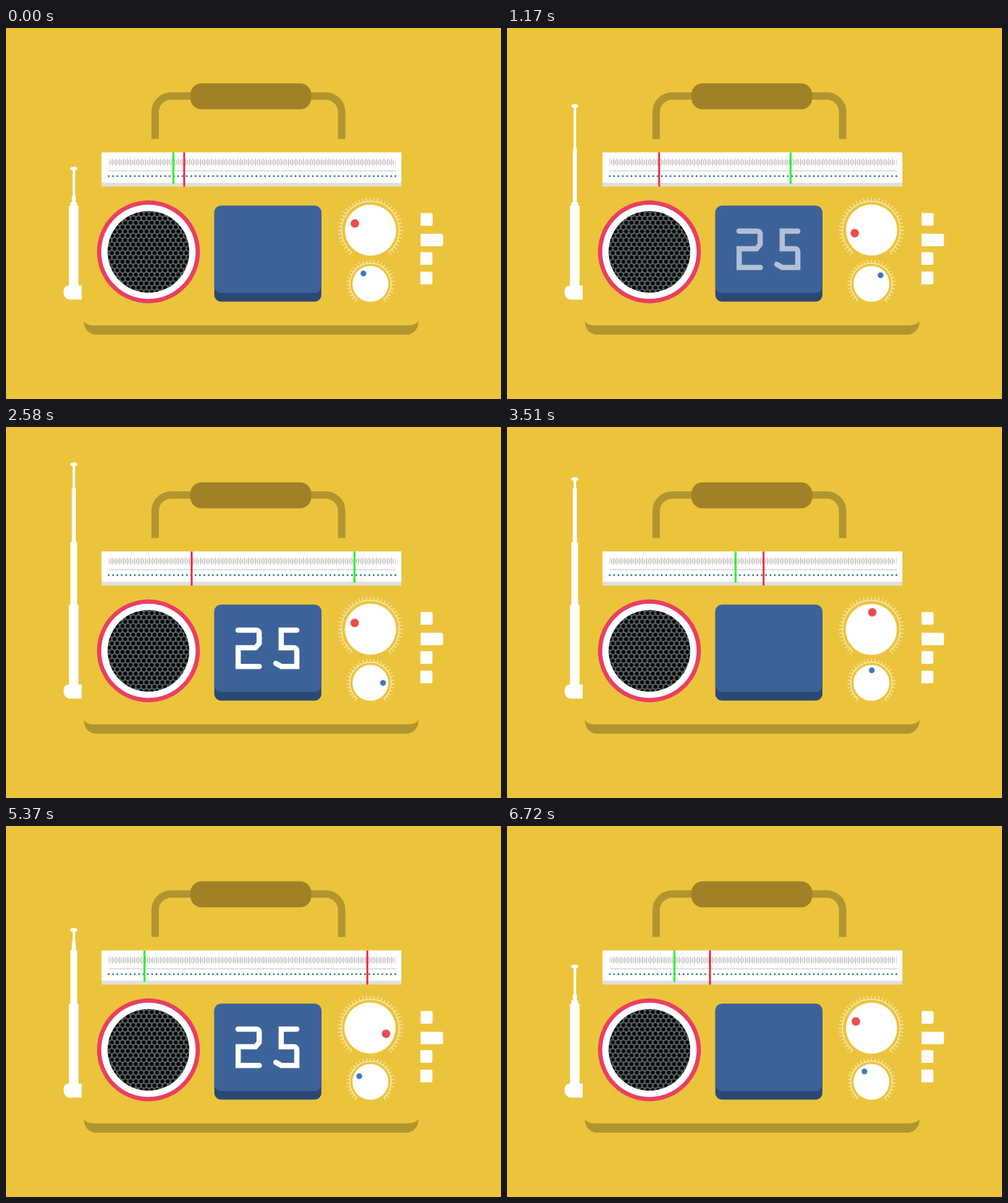
Animation, 800 px wide and 600 px high, one loop 6.75 s. Source, as an HTML page:

```html
<!DOCTYPE html>
<html lang="en">
<head>
<meta charset="utf-8">
<title>Radio</title>
<style>
html, body { margin: 0; width: 100%; height: 100%; overflow: hidden; background: #ecc43c; }
svg { display: block; width: 800px; height: 600px; }

.move { animation: 6750ms linear infinite; }
#mast { animation-name: mast; }
#rod { animation-name: rod; }
#tip { animation-name: tip; }
#red { animation-name: red; }
#green { animation-name: green; }
#tune { animation-name: tune; }
#volume { animation-name: volume; }
#digits { animation-name: digits; }

/* antenna sections, each nested in the one below it */
@keyframes mast {
  0%, 19.78% { transform: translateY(282px); }
  29.33%, 77.48% { transform: translateY(186px); }
  91.11%, 100% { transform: translateY(282px); }
}
@keyframes rod {
  0%, 9.93% { transform: translateY(-10px); }
  17.33%, 52.44% { transform: translateY(-87px); }
  60.89%, 77.48% { transform: translateY(-14px); }
  91.11%, 100% { transform: translateY(-10px); }
}
@keyframes tip {
  0% { transform: translateY(-48px); }
  9.93%, 31.56% { transform: translateY(-72px); }
  43.56%, 77.48% { transform: translateY(-18px); }
  91.11%, 100% { transform: translateY(-48px); }
}

/* needles, each with its knob */
@keyframes red {
  0% { transform: translateX(288px); }
  22.22%, 30.3% { transform: translateX(234px); }
  72.37%, 79.78% { transform: translateX(584px); }
  99.56%, 100% { transform: translateX(328px); }
}
@keyframes tune {
  0% { transform: rotate(-66.7deg); }
  22.22%, 30.3% { transform: rotate(-110deg); }
  72.37%, 79.78% { transform: rotate(110deg); }
  99.56%, 100% { transform: rotate(-66.7deg); }
}
@keyframes green {
  0%, 4.15% { transform: translateX(270.5px); }
  29.33%, 33.56% { transform: translateX(629px); }
  63.19%, 74.67% { transform: translateX(212.3px); }
  99.56%, 100% { transform: translateX(270.5px); }
}
@keyframes volume {
  0%, 4.15% { transform: rotate(-34deg); }
  29.33%, 33.56% { transform: rotate(120deg); }
  63.19%, 74.67% { transform: rotate(-70deg); }
  99.56%, 100% { transform: rotate(-34deg); }
}

@keyframes digits {
  0% { opacity: 0; }
  28.89%, 39.11% { opacity: 1; }
  51.11%, 52.44% { opacity: 0; }
  64.44%, 88.89% { opacity: 1; }
  99.1%, 100% { opacity: 0; }
}
</style>
</head>
<body>
<svg viewBox="0 0 800 600">
  <defs>
    <pattern id="holes" patternUnits="userSpaceOnUse" x="222.7" y="293.9" width="8.6" height="14">
      <rect width="8.6" height="14" fill="#566062"/>
      <circle cx="4.3" cy="7" r="3.1"/>
      <circle cx="0" cy="0" r="3.1"/>
      <circle cx="8.6" cy="0" r="3.1"/>
      <circle cx="0" cy="14" r="3.1"/>
      <circle cx="8.6" cy="14" r="3.1"/>
    </pattern>
    <path id="key" d="M0 0h16.5a3 3 0 0 1 3 3v14.500a3 3 0 0 1-3 3h-16.500z"/>
  </defs>

  <rect width="800" height="600" fill="#ecc43c"/>

  <!-- handle and foot -->
  <path d="M241 179.500V136a26 26 0 0 1 26-26H516.500a26 26 0 0 1 26 26V179.500" fill="none" stroke="#b2952f" stroke-width="12"/>
  <rect x="298" y="89.500" width="195.300" height="42" rx="18" fill="#a08128"/>
  <path d="M126 473.500q3 7.500 18 7.500H648q15 0 18.500-7.500V476a20 20 0 0 1-20 20H146a20 20 0 0 1-20-20z" fill="#b2952f"/>

  <!-- antenna -->
  <g fill="#fff">
    <path d="M101.700 287.500H117.200V416.500H122.300V439.300H103.500a10.300 10.300 0 0 1-10.300-10.300V425q0-8 8.500-8.500z"/>
    <g id="mast" class="move">
      <rect x="104" width="11" height="106"/>
      <g id="rod" class="move">
        <rect x="106.400" width="6.500" height="95"/>
        <g id="tip" class="move">
          <rect x="107.700" y="3" width="4" height="74"/>
          <ellipse cx="109.600" cy="3.300" rx="5.700" ry="3.200"/>
        </g>
      </g>
    </g>
  </g>

  <!-- dial -->
  <rect x="154.500" y="201.300" width="484.500" height="55.200" fill="#e2e0dc"/>
  <rect x="154.500" y="201.300" width="484.500" height="49" fill="#fff"/>
  <g fill="none" stroke="#9c9c9c">
    <path d="M171.600 217H626" stroke-width="11" stroke-dasharray="1 4.930"/>
    <path d="M168.600 217H628" stroke-width="7" stroke-dasharray="1 4.930"/>
    <path d="M166.500 211.500V222.500M629.300 211.500V222.500" stroke="#d2d2d2"/>
    <path d="M166 231H630" stroke="#bdbdbd" stroke-width="1.200"/>
    <path d="M166 239.500H629.500" stroke="#1f7b93" stroke-width="3" stroke-linecap="round" stroke-dasharray="0 7.020"/>
  </g>
  <rect id="green" class="move" x="-1.500" y="201.300" width="3" height="50.700" fill="#1cf216"/>
  <rect id="red" class="move" x="-1.500" y="201.300" width="3" height="55.200" fill="#f2222f"/>

  <!-- speaker -->
  <g fill="#fff">
    <circle cx="230.200" cy="362" r="83.200" fill="#ea3f61"/>
    <circle cx="230.200" cy="362" r="76.300"/>
    <circle cx="230.200" cy="362" r="66" fill="url(#holes)"/>
  </g>

  <!-- screen -->
  <rect x="336.700" y="287.500" width="173" height="155" rx="11" fill="#2c4874"/>
  <rect x="336.700" y="287.500" width="173" height="141" rx="11" fill="#3c6399"/>
  <g id="digits" class="move" fill="none" stroke="#fff" stroke-width="8.500" stroke-linecap="round">
    <path d="M375 328.500H404q5.200 0 5.200 5.200V350l-6 7H375.200V387.200H409.500"/>
    <path d="M470 328.500H444.800V357H465q5 0 5 5V387.200H445l-9-5"/>
  </g>

  <!-- knobs -->
  <g transform="translate(588.700 326.800)">
    <g fill="none" stroke="#fbefca">
      <path d="M-29.900 35.600A46.500 46.500 0 1 1 29.900 35.600" stroke-width="1.300"/>
      <path d="M-31.900 38A49.600 49.600 0 1 1 31.900 38" stroke-width="6" pathLength="40.200" stroke-dasharray=".2 .8"/>
    </g>
    <g id="tune" class="move">
      <circle cy=".5" r="41.300" fill="#fff"/>
      <circle cy="-27.200" r="6.900" fill="#ea4b4b"/>
    </g>
  </g>
  <g transform="translate(589 413.800)">
    <g fill="none" stroke="#fbefca">
      <path d="M-21.500 25.700A33.500 33.500 0 1 1 21.500 25.700" stroke-width="1.300"/>
      <path d="M-23.300 27.800A36.300 36.300 0 1 1 23.300 27.800" stroke-width="5" pathLength="30.200" stroke-dasharray=".2 .8"/>
    </g>
    <g id="volume" class="move">
      <circle r="29" fill="#fff"/>
      <circle cy="-20.300" r="4.700" fill="#3f73bc"/>
    </g>
  </g>

  <!-- side buttons -->
  <g fill="#fff">
    <use href="#key" x="670" y="299.300"/>
    <path d="M670 332.800h33.300a3 3 0 0 1 3 3v14.300a3 3 0 0 1-3 3h-33.300z"/>
    <use href="#key" x="669.700" y="362.600"/>
    <use href="#key" x="669.700" y="394"/>
  </g>
</svg>
</body>
</html>
```
